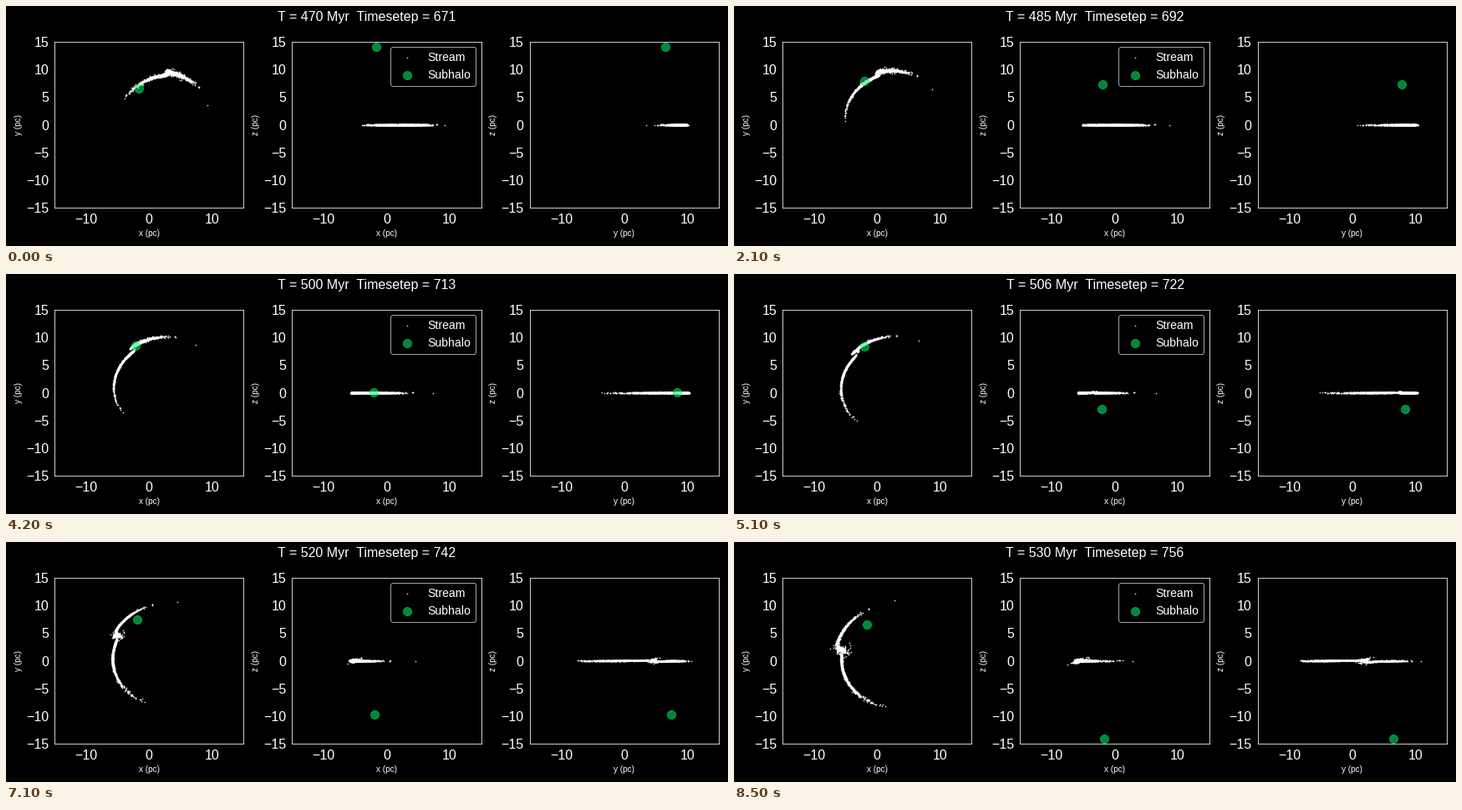
Animation, 864 px wide and 288 px high, one loop 8600 ms. Source, as a matplotlib script:

```python
import matplotlib.pyplot as plt
import numpy as np
from matplotlib.animation import FuncAnimation

FRAMES, INTERVAL = 86, 100
FIRST_STEP = 671
MYR_PER_STEP = 700 / 999
V0_SQ = 0.026        # squared circular speed of the halo, per frame
GM, SOFT = 0.0017, 0.03
T_HIT = 42.4         # frame at which the subhalo crosses the stream plane

plt.rcParams.update({
    "font.family": "Liberation Sans",
    "text.color": "white",
    "axes.labelcolor": "white",
    "axes.edgecolor": "white",
    "axes.facecolor": "black",
    "axes.linewidth": 0.8,
    "xtick.color": "white",
    "ytick.color": "white",
})


def subhalo(t):
    u = t - T_HIT
    return np.array([-2.08 + 0.00026 * u**2,
                     8.45 - 0.00128 * u**2 + 1.35e-7 * u**4,
                     -0.347 * u + 8.5e-6 * u**3])


def to_cartesian(theta, r, ang_mom, vr, z, vz):
    c, s = np.cos(theta), np.sin(theta)
    vt = ang_mom / r
    pos = np.column_stack([r * c, r * s, z])
    vel = np.column_stack([vr * c - vt * s, vr * s + vt * c, vz])
    return pos, vel


def make_stream(n=620, seed=4):
    rng = np.random.default_rng(seed)

    # leading arm: inside the progenitor orbit, falling inwards
    off = np.abs(rng.normal(0, 18, n))
    u = off / 55
    lead = [72 + off,
            9.55 - 3.3 * u - 0.8 * u * (1 - u) + rng.laplace(0, 0.08, n),
            1.165 - 0.075 * u,
            -0.015 - 0.056 * u]

    # trailing arm: outside, still climbing to apocentre at its far end
    off = np.abs(rng.normal(0, 13, n))
    u = off / 35
    trail = [75 - off,
             10.0 + 0.45 * u + rng.laplace(0, 0.13, n),
             1.272 + 0.035 * u,
             -0.012 + 0.047 * u]

    stray = [[20.8], [9.84], [1.38], [0.055]]
    theta, r, ang_mom, vr = (np.concatenate(p) for p in zip(lead, trail, stray))

    size = 2 * n
    ang_mom[:size] += rng.normal(0, 0.006, size)
    vr[:size] += rng.normal(0, 0.0014, size)
    z = rng.normal(0, 0.035, size + 1)
    vz = rng.normal(0, 0.0006, size + 1)
    return to_cartesian(np.radians(theta), r, ang_mom, vr, z, vz)


def accel(pos, t):
    halo = -V0_SQ * pos / np.sum(pos**2, axis=1, keepdims=True)
    d = subhalo(t) - pos
    dist_sq = np.sum(d**2, axis=1, keepdims=True) + SOFT**2
    return halo + GM * d / dist_sq**1.5


def integrate():
    pos, vel = make_stream()
    track = [pos.copy()]
    for frame in range(FRAMES - 1):
        n = 60 if abs(frame - T_HIT) < 4 else 4
        dt = 1 / n
        for k in range(n):
            pos = pos + vel * dt / 2
            vel = vel + accel(pos, frame + (k + 0.5) * dt) * dt
            pos = pos + vel * dt / 2
        track.append(pos.copy())
    return track


track = integrate()

fig = plt.figure(figsize=(12, 4), dpi=72, facecolor="black")
title = fig.suptitle("", fontsize=16, y=0.98)

panels = []
for k, (i, j) in enumerate([(0, 1), (0, 2), (1, 2)]):
    ax = fig.add_axes([(58 + 284.3 * k) / 864, 45.8 / 288,
                       226.3 / 864, 199.2 / 288])
    ax.set(xlim=(-15, 15), ylim=(-15, 15),
           xticks=[-10, 0, 10], yticks=range(-15, 16, 5))
    ax.tick_params(length=0, pad=7, labelsize=16)
    ax.set_xlabel(f"{'xyz'[i]} (pc)", fontsize=10)
    ax.set_ylabel(f"{'xyz'[j]} (pc)", fontsize=10)
    stars = ax.scatter([], [], s=1, c="white", alpha=0.7, linewidths=0.8,
                       label="Stream", zorder=2)
    halo = ax.scatter([], [], s=100, c="#00ff70", alpha=0.53, linewidths=1,
                      label="Subhalo", zorder=3)
    panels.append((stars, halo, [i, j]))
    if k == 1:
        ax.legend(loc="upper right", fontsize=14, scatterpoints=1,
                  borderaxespad=0.45, facecolor="black", edgecolor="0.8")


def draw(frame):
    step = FIRST_STEP + frame
    title.set_text(f"T = {step * MYR_PER_STEP:.0f} Myr  Timesetep = {step}")
    sub = subhalo(frame)
    for stars, halo, axes in panels:
        stars.set_offsets(track[frame][:, axes])
        halo.set_offsets([sub[axes]])
    return [title] + [a for p in panels for a in p[:2]]


anim = FuncAnimation(fig, draw, frames=FRAMES, interval=INTERVAL,
                     init_func=lambda: draw(0), repeat=True, repeat_delay=0,
                     blit=False)
plt.show()
```
